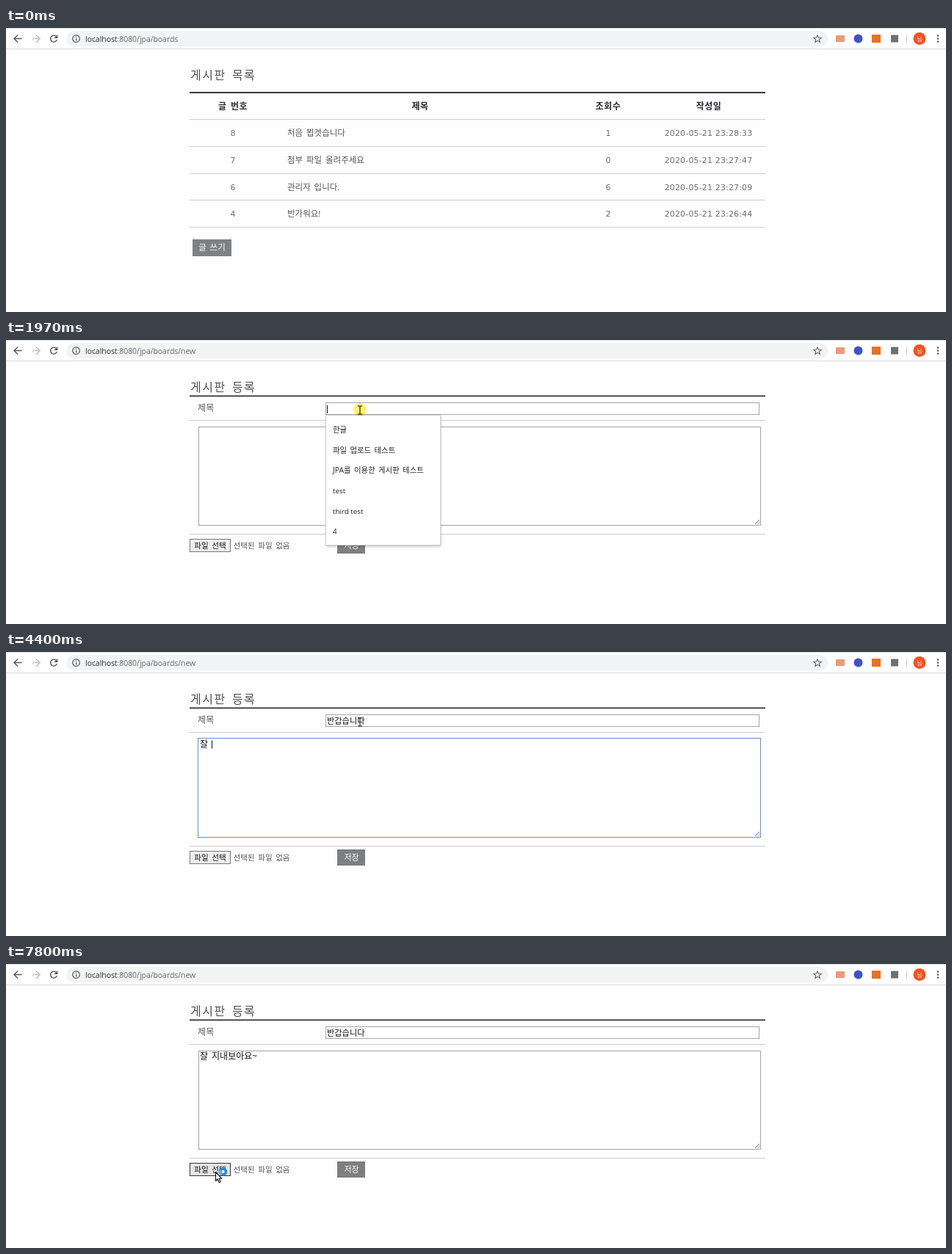
An HTML page with a canvas that plays this animation: 1280x387 px, repeating every 8 s.

```html
<!DOCTYPE html>
<html lang="ko">
<head>
<meta charset="utf-8">
<title>게시판</title>
<style>
html, body { margin: 0; width: 100%; height: 100%; overflow: hidden; background: #fefefe; }
canvas { display: block; width: 1280px; height: 387px; }
</style>
</head>
<body>
<canvas id="stage" width="1280" height="387"></canvas>
<script>
const ctx = document.getElementById('stage').getContext('2d');
const LOOP = 8000;
const SANS = '"Open Sans", "Noto Sans CJK KR", "Noto Sans CJK", sans-serif';
const DIGITS = '"DejaVu Sans", sans-serif';
const HANGUL = /[ㄱ-ㅎ가-힣]/;

const POSTS = [
  ['8', '처음 뵙겟습니다', '1', '2020-05-21 23:28:33'],
  ['7', '첨부 파일 올려주세요', '0', '2020-05-21 23:27:47'],
  ['6', '관리자 입니다.', '6', '2020-05-21 23:27:09'],
  ['4', '반가워요!', '2', '2020-05-21 23:26:44']
];
const HINTS = ['한글', '파일 업로드 테스트', 'JPA를 이용한 게시판 테스트', 'test', 'third test', '4'];

// Each entry is the time of a key press and the field's text after it.
const TITLE_KEYS = [
  [1970, ''], [2430, 'ㅂ'], [2540, '바'], [2650, '반'], [2760, '반ㄱ'], [2860, '반가'],
  [2970, '반갑'], [3070, '반값'], [3180, '반갑스'], [3300, '반갑습'], [3410, '반갑습ㄴ'],
  [3520, '반갑습니'], [3630, '반갑습닏'], [3740, '반갑습니다']
];
const BODY_KEYS = [
  [3960, ''], [4180, '자'], [4290, '잘'], [4400, '잘 '], [4510, '잘 지'], [4620, '잘 진'],
  [4740, '잘 지내'], [5170, '잘 지냅'], [5280, '잘 지내보'], [5400, '잘 지내봉'],
  [5510, '잘 지내보아'], [5730, '잘 지내보아요'], [6590, '잘 지내보아요~']
];
const CARET_ON = 430;

const within = (t, a, b) => t >= a && t < b;

function box(x, y, w, h, fill) {
  ctx.fillStyle = fill;
  ctx.fillRect(x, y, w, h);
}

function frame(x, y, w, h, color) {
  ctx.strokeStyle = color;
  ctx.lineWidth = 1;
  ctx.strokeRect(x + .5, y + .5, w - 1, h - 1);
}

function disc(x, y, r, fill) {
  ctx.fillStyle = fill;
  ctx.beginPath();
  ctx.arc(x, y, r, 0, 7);
  ctx.fill();
}

function line(points, color, width = 1.5) {
  ctx.strokeStyle = color;
  ctx.lineWidth = width;
  ctx.beginPath();
  points.forEach(([x, y]) => ctx.lineTo(x, y));
  ctx.stroke();
}

// y is the middle of the line of text; returns the text width.
function text(str, x, y, size, color, opt = {}) {
  ctx.font = `${opt.weight || 400} ${size}px ${opt.font || SANS}`;
  ctx.letterSpacing = `${opt.spacing || 0}px`;
  ctx.wordSpacing = HANGUL.test(str) ? `${size * .16}px` : '0px';
  ctx.textAlign = opt.align || 'left';
  ctx.fillStyle = color;
  ctx.fillText(str, x, y + size * .38);
  return ctx.measureText(str).width;
}

function toolbar(path, loading) {
  box(0, 0, 1280, 28, '#fff');
  box(0, 0, 1280, 1, '#e3e5e8');
  box(0, 28, 1280, 1, '#dcdee1');
  ctx.fillStyle = '#f1f3f4';
  ctx.beginPath();
  ctx.roundRect(82, 4, 1037, 21, 10.5);
  ctx.fill();

  const dark = '#55585c', pale = '#bcbec1';
  line([[21.5, 14.5], [11.5, 14.5]], dark);
  line([[16, 9.5], [11, 14.5], [16, 19.5]], dark);
  line([[35.5, 14.5], [45.5, 14.5]], pale);
  line([[41, 9.5], [46, 14.5], [41, 19.5]], pale);
  if (loading) {
    line([[61, 10.5], [69, 18.5]], dark);
    line([[69, 10.5], [61, 18.5]], dark);
  } else {
    ctx.strokeStyle = dark;
    ctx.lineWidth = 1.5;
    ctx.beginPath();
    ctx.arc(65, 14.5, 4.4, .35, 5.5);
    ctx.stroke();
    ctx.fillStyle = dark;
    ctx.beginPath();
    ctx.moveTo(70.3, 9);
    ctx.lineTo(70.3, 14);
    ctx.lineTo(65.3, 14);
    ctx.fill();
  }

  ctx.strokeStyle = dark;
  ctx.lineWidth = 1.2;
  ctx.beginPath();
  ctx.arc(95.5, 14.5, 4.8, 0, 7);
  ctx.stroke();
  box(95, 14, 1.2, 3.4, dark);
  box(95, 11.6, 1.2, 1.3, dark);

  const hostWidth = text('localhost', 108, 15, 10.4, '#2b2d30');
  text(':8080' + path, 108 + hostWidth, 15, 10.4, '#65696e');

  const star = [];
  for (let i = 0; i <= 10; i++) {
    const a = i * Math.PI / 5 - Math.PI / 2, r = i % 2 ? 2.4 : 5.4;
    star.push([1105 + r * Math.cos(a), 15 + r * Math.sin(a)]);
  }
  line(star, '#5f6368', 1.1);

  box(1130, 10, 12, 9, '#ef9a78');
  disc(1160.5, 14.5, 6, '#4452c4');
  box(1179, 9, 12, 11, '#e8711f');
  box(1205, 9.5, 10, 10, '#707070');
  box(1226, 9, 1, 12, '#d0d2d5');
  disc(1244, 14.5, 8.5, '#f4511e');
  text('님', 1244, 14.5, 8, '#fff', { align: 'center' });
  for (const y of [10.5, 14.5, 18.5]) disc(1269, y, 1.3, dark);
}

function heading(str) {
  text(str, 251, 64, 16, '#505050', { spacing: 1.5 });
}

function listPage(hover) {
  heading('게시판 목록');
  box(250, 87, 784, 2, '#3a3a3a');
  const center = [309, 564, 820, 957];
  ['글 번호', '제목', '조회수', '작성일'].forEach((s, i) =>
    text(s, center[i], 106, 12, '#2c2630', { weight: 700, align: 'center', spacing: .4 }));
  box(250, 124, 784, 1, '#cfcfcf');
  POSTS.forEach(([id, title, hits, date], i) => {
    const y = 143 + i * 36.7;
    const num = { font: DIGITS, align: 'center' };
    text(id, 309, y, 11, '#6c6c6c', num);
    text(title, 383, y, 11.5, '#555');
    text(hits, 820, y, 11, '#6c6c6c', num);
    text(date, 956.5, y, 11, '#6c6c6c', { ...num, spacing: .15 });
    box(250, Math.round(161 + i * 36.7), 784, 1, '#cfcfcf');
  });
  box(254, 288, 53, 23, hover ? '#6b9ab8' : '#7e8183');
  text('글 쓰기', 280.5, 299, 11.5, '#fff', { align: 'center' });
}

// A text field's content with its caret and the underline of the unfinished syllable.
function field(keys, t, x, y, size, focused) {
  const key = keys.filter(k => t >= k[0]).pop();
  if (!key) return;
  const [time, str] = key;
  const end = x + (str ? text(str, x, y, size, '#111') : 0);
  if (!focused) return;
  if (HANGUL.test(str.slice(-1))) box(end - size * .88, y + 5, size * .84, 1, '#222');
  if (t - time < CARET_ON || !str) box(Math.round(end), y - 5, 1, 11, '#111');
}

function hintList() {
  ctx.save();
  ctx.shadowColor = 'rgba(0,0,0,.3)';
  ctx.shadowBlur = 3;
  ctx.shadowOffsetY = 1;
  box(436, 102, 156, 178, '#fff');
  ctx.restore();
  frame(435, 102, 157, 178, '#d2d2d2');
  HINTS.forEach((s, i) =>
    text(s, 445, 122 + i * 27.7, HANGUL.test(s) ? 10.4 : 9.8, '#222'));
}

function formPage(t, hover) {
  const inTitle = t < 3960, inBody = within(t, 3960, 7480);
  heading('게시판 등록');
  box(250, 75.5, 784, 1.7, '#303030');
  text('제목', 261, 92, 12, '#555', { spacing: .3 });
  box(435, 85, 591, 17, '#fff');
  frame(435, 85, 591, 17, '#a6a6a6');
  box(250, 109, 784, 1, '#cfcfcf');

  box(262, 118, 766, 135, '#fff');
  if (inBody) frame(261, 117, 767, 136, '#5f8fd2');
  else frame(262, 118, 766, 135, '#a3a3a3');
  line([[1020, 251], [1026, 245]], '#777', 1);
  line([[1023.5, 251], [1026, 248.5]], '#777', 1);
  box(250, 264, 784, 1, '#cfcfcf');

  box(250, 271, 56, 18, hover ? '#e5e5e5' : '#efefef');
  frame(250, 271, 56, 18, t >= 7480 ? '#333' : '#777');
  text('파일 선택', 278, 280, 10.6, '#111', { align: 'center' });
  text('선택된 파일 없음', 309.5, 280, 10.6, '#5a5a5a');
  box(451, 269, 38, 22, '#7d7f80');
  text('저장', 470.5, 280, 11, '#fff', { align: 'center' });

  field(TITLE_KEYS, t, 437, 94, 11.2, inTitle);
  field(BODY_KEYS, t, 264, 125.5, 12, inBody);
  if (within(t, 1970, 2430)) hintList();
}

// Moves in n equal jumps, the first at t0 and the last at t1.
function travel(t, t0, t1, n, [x0, y0], [x1, y1]) {
  const jump = Math.floor((t - t0) / (t1 - t0) * (n - 1) + 1e-6) + 1;
  const p = Math.max(0, Math.min(1, jump / n));
  return [x0 + (x1 - x0) * p, y0 + (y1 - y0) * p];
}

function pointerAt(t) {
  const write = [290, 311], title = [482, 95], file = [284, 273];
  if (t < 1310) return travel(t, 220, 880, 7, [1300, 392], write);
  if (t < 6830) return travel(t, 1310, 1870, 6, write, title);
  if (t < 7480) return travel(t, 6830, 7260, 5, title, file);
  return [285, 283];
}

const inside = ([px, py], x, y, w, h) => px >= x && px <= x + w && py >= y && py <= y + h;

function outline(path, x, y) {
  ctx.save();
  ctx.translate(x, y);
  const shape = new Path2D(path);
  ctx.lineJoin = 'round';
  ctx.lineWidth = 1.1;
  ctx.fillStyle = '#fff';
  ctx.strokeStyle = '#111';
  ctx.fill(shape);
  ctx.stroke(shape);
  ctx.restore();
}

function arrow(x, y) {
  outline('M.5 .5V12.5L3.2 10L5.2 14.7L7.2 13.8L5.2 9.3H8.8Z', x, y);
}

function hand(x, y) {
  outline('M-1 1Q.3-1 1.5 1V6Q3 4.8 4 6.4Q5.6 5.4 6.4 7Q8.4 6.4 8.5 8.6V12' +
    'Q8.3 14.5 6.8 17H-.2Q-1.5 14.6-4 11.5Q-5.3 9-3.4 9L-1 11Z', x, y);
}

function beam(x, y) {
  const c = '#222';
  line([[x, y - 5], [x, y + 6]], c, 1.2);
  for (const e of [y - 5, y + 6]) line([[x - 3, e], [x + 3, e]], c, 1.1);
}

function busy(t, x, y) {
  disc(x, y, 5.8, '#2b86d9');
  disc(x, y, 2.2, '#e8f4ff');
  ctx.strokeStyle = '#7fc4f5';
  ctx.lineWidth = 1.8;
  const a = Math.floor(t / 108) * .9;
  ctx.beginPath();
  ctx.arc(x, y, 4.3, a, a + 1.6);
  ctx.stroke();
}

function draw(t) {
  const onForm = t >= 1200;
  const pos = pointerAt(t);
  const visible = t >= 220;
  const onWrite = visible && !onForm && inside(pos, 254, 288, 53, 24);
  const onFile = onForm && inside(pos, 250, 271, 56, 18);
  const onText = onForm && (inside(pos, 435, 85, 591, 17) || inside(pos, 262, 118, 766, 135));

  box(0, 0, 1280, 387, '#fefefe');
  toolbar(onForm ? '/jpa/boards/new' : '/jpa/boards', within(t, 1090, 1310));
  if (onForm) formPage(t, onFile); else listPage(onWrite);
  if (!visible) return;

  const pressed = within(t, 990, 1200) || within(t, 1970, 2090) || within(t, 7480, 7590);
  if (pressed) {
    ctx.globalCompositeOperation = 'multiply';
    disc(...pos, 9, '#fff36a');
    ctx.globalCompositeOperation = 'source-over';
  }
  if (onWrite) hand(...pos);
  else if (onText) beam(...pos);
  else arrow(...pos);
  if (t >= 7590) busy(t, pos[0] + 10.5, pos[1]);
}

const start = performance.now();
function tick() {
  draw((performance.now() - start) % LOOP);
  requestAnimationFrame(tick);
}
tick();
</script>
</body>
</html>
```
